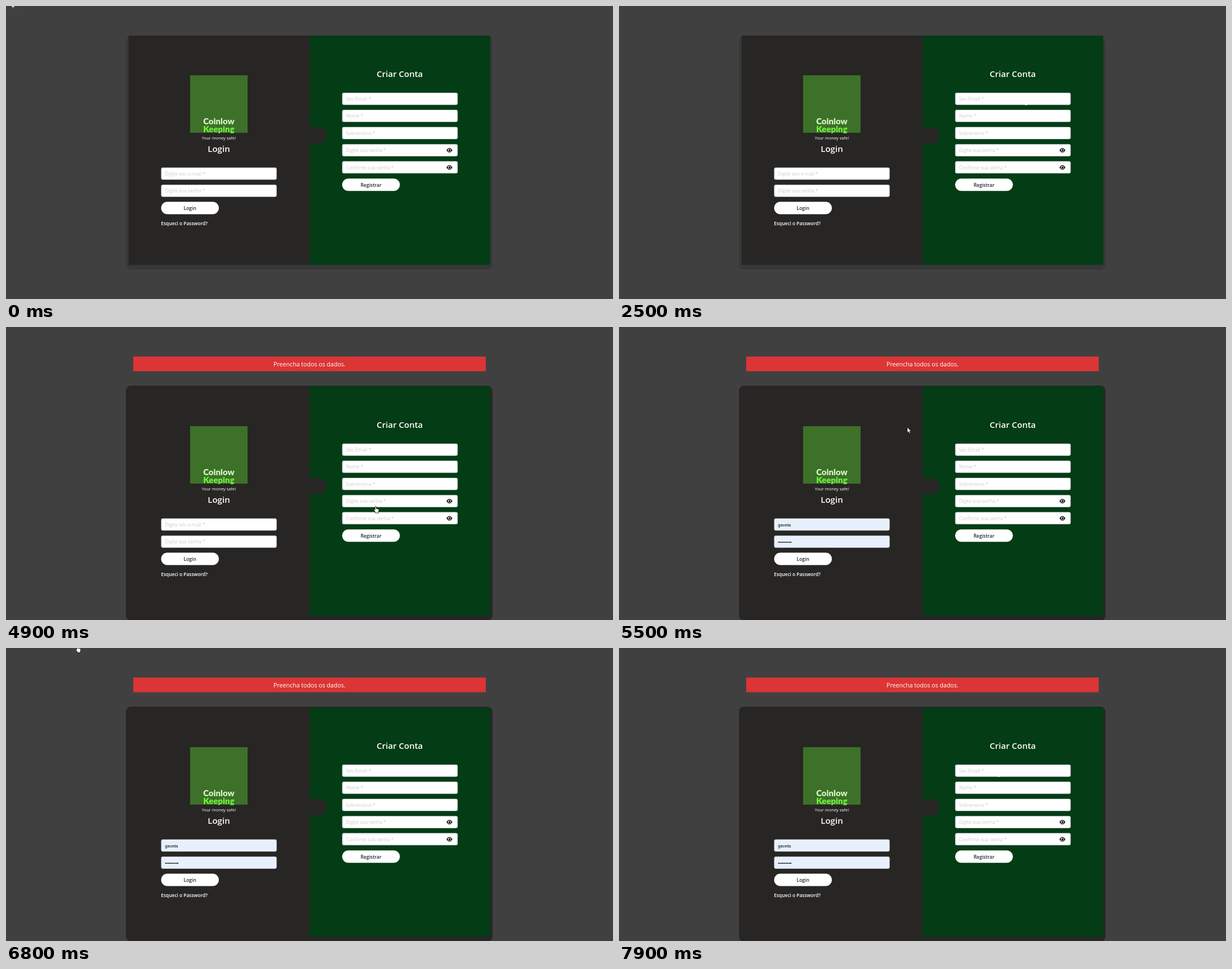
Recreate the animation shown at these times as an HTML page. Size 1078 px wide and 520 px high, loop 8 s.

```html
<!DOCTYPE html>
<html lang="pt">
<head>
<meta charset="utf-8">
<title>Login</title>
<style>
  html, body { margin: 0; width: 100%; height: 100%; overflow: hidden; background: #404040; }
  svg { display: block; font-family: "Open Sans", "Noto Sans", sans-serif; }
  .heading { font-size: 15px; font-weight: 600; fill: #fff; text-anchor: middle; }
  .hint { font-size: 8.4px; fill: #cbcdcd; }
  .action { font-size: 8.5px; font-weight: 600; fill: #212529; text-anchor: middle; }
  .link { font-size: 8.4px; font-weight: 600; fill: #fff; }
  .typed { font: 7.7px "Liberation Sans", sans-serif; fill: #000; }
  .brand { font: 900 15px Lato, sans-serif; text-anchor: middle; }
  .motto { font-size: 7.5px; fill: #fff; text-anchor: middle; }
  .alert { font-size: 10.65px; fill: #fff; text-anchor: middle; }
</style>
</head>
<body>
<svg id="stage" width="1078" height="520" viewBox="0 0 1078 520"></svg>
<script>
const LOOP = 8000, STEP = 100;
const SUBMITTED = 4900, AUTOFILLED = 5100, SHIFT = 53;
const DARK = '#282625', SHADOW = '#383838';

const text = (cls, x, y, value, extra = '') =>
  `<text class="${cls}" x="${x}" y="${y}" ${extra}>${value}</text>`;

const field = (x, y, hint, cls = '') => `
  <rect class="${cls}" x="${x + .3}" y="${y + .3}" width="204.6" height="21" rx="2.4"
    fill="#fff" stroke="#ced4da" stroke-width=".6"/>
  ${text('hint ' + cls, x + 6.7, y + 14, hint)}`;

const button = (x, y, label) => `
  <rect x="${x}" y="${y}" width="102.5" height="22" rx="11" fill="#fff"/>
  ${text('action', x + 51.2, y + 14.4, label)}`;

const eye = y => `
  <g transform="translate(787.5 ${y})">
    <path d="M-5.2 0Q-2.7-4.1 0-4.1T5.2 0Q2.7 4.1 0 4.1T-5.2 0Z"/>
    <circle r="2.8" fill="#fff"/><circle r="1.9"/>
    <circle cx="-.8" cy="-.8" r=".7" fill="#fff"/>
  </g>`;

const registerHints = ['Seu Email *', 'Nome *', 'Sobrenome *', 'Digite sua senha *', 'Confirme sua senha *'];

const stage = document.getElementById('stage');
stage.innerHTML = `
  <rect width="1078" height="520" fill="#404040"/>
  <g id="alert">
    <rect x="226" y="52.5" width="626" height="26" fill="#dc3535"/>
    ${text('alert', 539, 70, 'Preencha todos os dados.')}
  </g>
  <g id="panel">
    <rect id="shadow" x="213" width="651" rx="9"/>
    <rect x="217.5" y="52.5" width="323" height="407" fill="${DARK}"/>
    <rect x="539.5" y="52.5" width="320.5" height="407" fill="#033c15"/>
    <path d="M539.5 215H555A14.5 14.5 0 0 1 555 244H539.5Z" fill="${DARK}"/>

    <rect x="327" y="123" width="102" height="102" fill="#3d7028"/>
    ${text('brand', 378, 210, 'Coinlow', 'fill="#d3f6c0"')}
    ${text('brand', 378, 223.5, 'Keeping', 'fill="#70f23f"')}
    ${text('motto', 378, 236.5, 'Your money safe!')}

    ${text('heading', 378, 259, 'Login')}
    ${field(275.5, 286.7, 'Digite seu e-mail *', 'login')}
    ${field(275.5, 317.1, 'Digite sua senha *', 'login')}
    <g id="typed">
      ${text('typed', 282.3, 301, 'gaveta')}
      ${text('typed', 282.3, 331.4, '•'.repeat(9))}
    </g>
    ${button(275.5, 347.5, 'Login')}
    ${text('link', 275.3, 388.5, 'Esqueci o Password?')}

    ${text('heading', 699.3, 126.3, 'Criar Conta')}
    ${registerHints.map((hint, i) => field(597, 153.9 + i * 30.4, hint)).join('')}
    ${eye(256)}${eye(286.5)}
    ${button(597, 306.2, 'Registrar')}
  </g>
  <g id="cursor" stroke-linejoin="round">
    <path data-kind="arrow" d="M0 0V9.6L2.2 7.6L3.7 11L5.3 10.3L3.8 7.1H6.8Z"
      fill="#fff" stroke="#111" stroke-width=".7"/>
    <path data-kind="hand" d="M-1 .8Q0-.6 1 .8V4.2L4.7 5Q6 5.3 5.8 7L5 9.5V12H-.5V10.5L-3.2 7Q-3.2 5.5-2 5.8L-1 6.8Z"
      fill="#fff" stroke="#111" stroke-width=".8"/>
    <path data-kind="beam" d="M-2-7.5H2M0-7.5V7.5M-2 7.5H2" fill="none" stroke="#fff"/>
  </g>`;

// time, x, y and, where it changes, the pointer shape
const path = [
  [0, 10, -6, 'arrow'], [200, 10, -6], [300, 55, 10], [400, 125, 40], [500, 173, 58],
  [600, 173, 58], [1200, 194, 80], [1300, 194, 80], [1400, 195.5, 80], [1600, 195.5, 80],
  [1900, 420, 150], [2200, 690, 243, 'beam'], [2500, 723, 168], [2600, 723, 168],
  [3500, 664, 283], [3600, 660, 302, 'arrow'], [3700, 660, 302],
  [3800, 656.5, 318, 'hand'], [5000, 656.5, 318], [5100, 640, 300, 'arrow'],
  [5900, 384, 56], [6000, 384, 56], [6500, 378.5, 56.5],
  [6800, 127, -4, 'hand'], [6900, 88, -4], [7000, 78, -4], [7100, 78, -4],
  [7200, 110, 4, 'arrow'], [7800, 605, 196], [7900, 675, 220.5, 'beam'], [LOOP, 675, 220.5]
];

function pointerAt(t) {
  const i = path.findIndex(key => key[0] > t);
  const [from, to] = [path[i - 1], path[i]];
  const k = (t - from[0]) / (to[0] - from[0]);
  const mix = n => from[n] + (to[n] - from[n]) * k;
  const kind = path.slice(0, i).reverse().find(key => key[3])[3];
  return { x: mix(1), y: mix(2), kind };
}

const get = id => document.getElementById(id);
const show = (el, on) => el.setAttribute('visibility', on ? 'visible' : 'hidden');

function render(ms) {
  const t = Math.floor(ms % LOOP / STEP) * STEP;
  const submitted = t >= SUBMITTED, filled = t >= AUTOFILLED;

  show(get('alert'), submitted);
  get('panel').setAttribute('transform', `translate(0 ${submitted ? SHIFT : 0})`);
  const top = submitted ? 51 : 54;
  const shadow = get('shadow');
  shadow.setAttribute('y', top);
  shadow.setAttribute('height', 468 - top);
  shadow.setAttribute('fill', submitted ? DARK : SHADOW);

  show(get('typed'), filled);
  stage.querySelectorAll('rect.login').forEach(el => el.setAttribute('fill', filled ? '#e8f0fe' : '#fff'));
  stage.querySelectorAll('text.login').forEach(el => show(el, !filled));

  const { x, y, kind } = pointerAt(t);
  const cursor = get('cursor');
  cursor.setAttribute('transform', `translate(${x} ${y})`);
  for (const shape of cursor.children) show(shape, shape.dataset.kind === kind);
}

const start = performance.now();
(function frame() {
  render(performance.now() - start);
  requestAnimationFrame(frame);
})();
</script>
</body>
</html>
```
